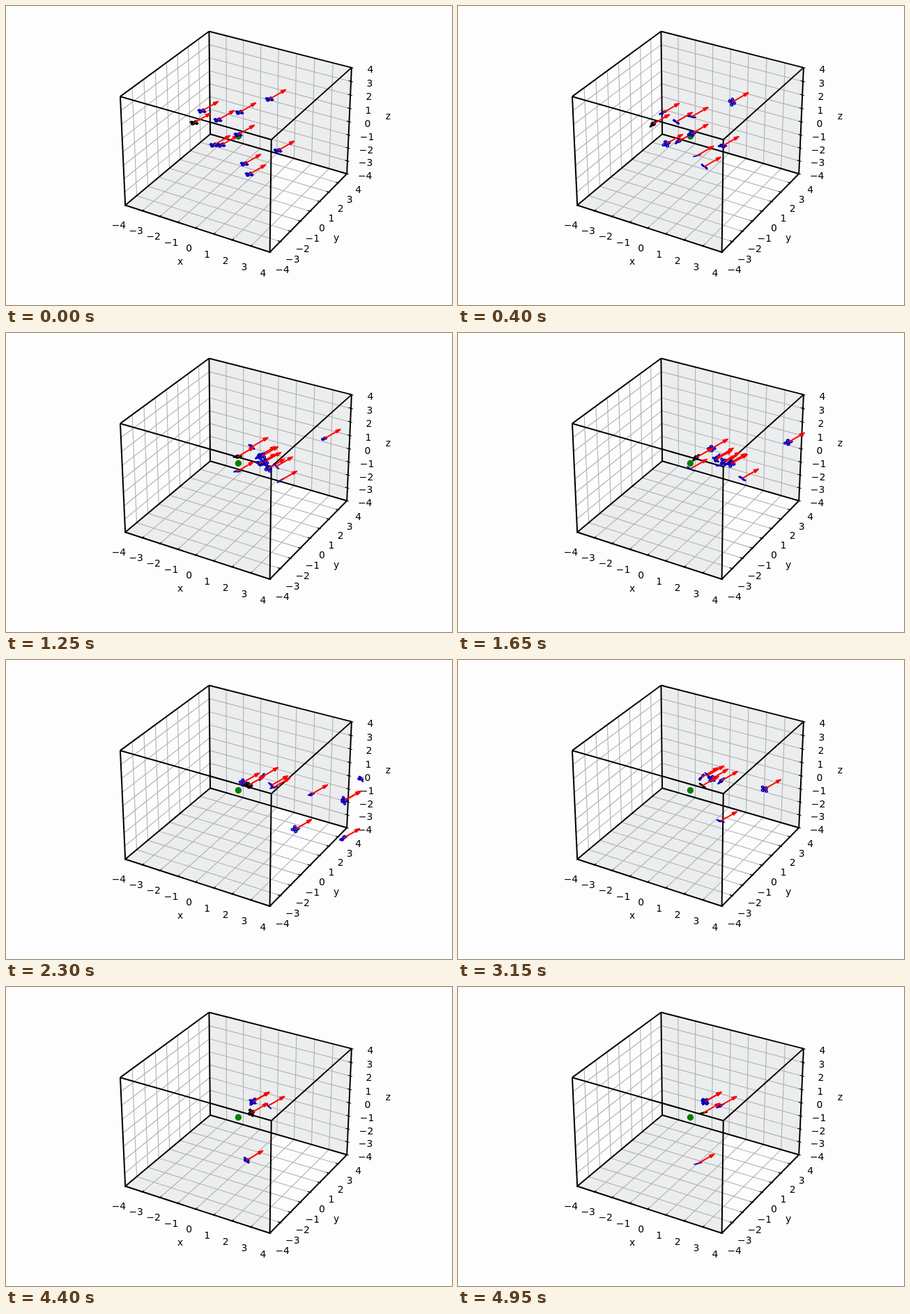
Write an HTML page that moves like this. It is 640 by 430 pixels and loops after 5 s.

```html
<!DOCTYPE html>
<html lang="en">
<head>
<meta charset="utf-8">
<title>Swarm in a box</title>
<style>
html, body { margin: 0; width: 100%; height: 100%; overflow: hidden; background: #fdfdfd; }
svg { display: block; width: 640px; height: 430px; }
text { font: 13.89px "DejaVu Sans", sans-serif; text-anchor: middle; }
path { fill: none; }
</style>
</head>
<body>
<svg id="stage" viewBox="0 0 640 430">
  <defs><clipPath id="axes"><rect width="513" height="430"/></clipPath></defs>
  <g id="box"></g>
  <g id="swarm" clip-path="url(#axes)"></g>
</svg>
<script>
const LOOP = 5000, STEP = 50;
const box = document.getElementById('box');
const swarm = document.getElementById('swarm');

function add(parent, tag, attrs, text) {
  const el = document.createElementNS('http://www.w3.org/2000/svg', tag);
  for (const k in attrs) el.setAttribute(k, attrs[k]);
  if (text !== undefined) el.textContent = text;
  parent.appendChild(el);
  return el;
}

// Perspective view: elevation 30, azimuth -60, distance 10.
function project(x, y, z) {
  const a = x / 7, b = y / 7, c = z * 3 / 28;
  const f = 2080 / (10 - (0.433 * a - 0.75 * b + 0.5 * c));
  return [333 + f * (0.866 * a + 0.5 * b), 187.9 - f * (-0.25 * a + 0.433 * b + 0.866 * c), f / 208];
}

const pathOf = pts => 'M' + pts.map(p => p[0].toFixed(2) + ' ' + p[1].toFixed(2)).join('L');
const line = (pts, stroke, width) =>
  add(box, 'path', { d: pathOf(pts.map(p => project(...p))), stroke, 'stroke-width': width });
const shade = pts => add(box, 'path', { d: pathOf(pts) + 'Z', style: 'fill: #ebedee' });

function label(v, point, dx, dy) {
  const [x, y, s] = project(...point);
  add(box, 'text', { x: x + dx * s, y: y + dy * s + 5 }, String(v).replace('-', '\u2212'));
}

function drawBox() {
  const a = project(-4, -4, -4), b = project(-4, 4, -4), c = project(4, 4, -4), d = project(4, -4, -4);
  const cut = [380.8, b[1] + (c[1] - b[1]) * (380.8 - b[0]) / (c[0] - b[0])];
  shade([b, c, project(4, 4, 4), project(-4, 4, 4)]);
  shade([a, b, cut, d]);

  for (let v = -3; v < 4; v++) {
    line([[v, -4, -4], [v, 4, -4], [v, 4, 4]], '#b0b0b0', 1.1);
    line([[4, v, -4], [-4, v, -4], [-4, v, 4]], '#b0b0b0', 1.1);
    line([[4, 4, v], [-4, 4, v], [-4, -4, v]], '#b0b0b0', 1.1);
  }
  for (const p of [-4, 4]) for (const q of [-4, 4]) {
    line([[-4, p, q], [4, p, q]], '#000', 2);
    line([[p, -4, q], [p, 4, q]], '#000', 2);
    line([[p, q, -4], [p, q, 4]], '#000', 2);
  }
  for (let v = -4; v <= 4; v++) {
    line([[v, -3.87, -4], [v, -4.07, -4]], '#000', 1.1);
    line([[3.87, v, -4], [4.07, v, -4]], '#000', 1.1);
    line([[3.87, 4, v], [4.1, 4, v]], '#000', 1.1);
    label(v, [v, -4, -4], -9.3, 28.4);
    label(v, [4, v, -4], 17.2, 24);
    label(v, [4, 4, v], 27, 2.5);
  }
  add(box, 'text', { x: 250, y: 372 }, 'x');
  add(box, 'text', { x: 474, y: 338 }, 'y');
  add(box, 'text', { x: 548.5, y: 163 }, 'z');
}

// The leader glides to its post and slows down on the way.
function leaderAt(s) {
  const left = 1 / (1 + (s / 0.83) ** 2.7);
  return [353 - 83 * left, 181 - 13 * left];
}

// Followers hold offsets from the leader at these shared seconds.
const BEATS = [0, 1.65, 2.3, 3.15, 3.85];
const HOME = [2, -16];

// Smooth curve through the offsets, then either ease home or fly straight on.
function offsetAt({ keys, home }, s) {
  const n = keys.length - 1, end = BEATS[n];
  const slope = (i, j, k) => (keys[j][k] - keys[i][k]) / (BEATS[j] - BEATS[i]);
  if (s >= end) {
    const ease = 1 - (1 - (s - end) / (LOOP / 1000 - end)) ** 3;
    return keys[n].map((v, k) => home ? v + (home[k] - v) * ease : v + slope(n - 1, n, k) * (s - end));
  }
  const i = BEATS.findIndex((b, j) => s < BEATS[j + 1]);
  const span = BEATS[i + 1] - BEATS[i], u = (s - BEATS[i]) / span;
  return keys[i].map((v, k) => {
    const e = keys[i + 1][k] - v;
    const m = slope(Math.max(i - 1, 0), i + 1, k) * span;
    const r = slope(i, Math.min(i + 2, n), k) * span;
    return v + u * (m + u * (3 * e - 2 * m - r + u * (m + r - 2 * e)));
  });
}

const drones = [];

function drone(keys, home, color = '#0000c0') {
  const g = add(swarm, 'g', {});
  const frame = add(g, 'path', { stroke: color, 'stroke-width': 1.7, 'stroke-linejoin': 'round' });
  add(g, 'path', {
    d: 'M0 0L23.2 -13.4M16.8 -12L23.2 -13.4L18.6 -8.8Z',
    stroke: '#f00', 'stroke-width': 2, 'stroke-linejoin': 'round', style: 'fill: #f00'
  });
  drones.push({ g, frame, keys, home, seed: drones.length + 1 });
}

// Four rotor rings on a cross that tilts more as the flight goes on.
function frameOf(seed, s) {
  const grow = Math.min(1, s * 2);
  const roll = grow * 0.9 * Math.sin(s * (2.1 + seed * 0.37) + seed);
  const pitch = grow * 0.9 * Math.sin(s * (2.7 + seed * 0.23) + seed * 2);
  const yaw = grow * Math.sin(s * 1.7 + seed);
  const [ox, oy] = project(0, 0, 0);
  const place = (r, a) => {
    const x = r[0] * Math.cos(yaw) - r[1] * Math.sin(yaw), y = r[0] * Math.sin(yaw) + r[1] * Math.cos(yaw);
    const p = project(x * Math.cos(pitch), y * Math.cos(roll), y * Math.sin(roll) - x * Math.sin(pitch));
    return [p[0] - ox, p[1] - oy];
  };
  let d = '';
  for (let k = 0; k < 4; k++) {
    const c = Math.cos(k * Math.PI / 2), n = Math.sin(k * Math.PI / 2);
    const ring = [];
    for (let j = 0; j < 8; j++) {
      const a = j * Math.PI / 4;
      ring.push(place([0.14 * c + 0.07 * Math.cos(a), 0.14 * n + 0.07 * Math.sin(a)]));
    }
    d += pathOf([[0, 0], place([0.14 * c, 0.14 * n])]) + pathOf(ring) + 'Z';
  }
  return d;
}

function buildSwarm() {
  drone([[28, 32], [-8, 16], [-8, -4]], HOME);
  add(swarm, 'circle', { cx: 333.4, cy: 187.5, r: 4.7, fill: '#008000' });
  drone([[11, -17], [22, -13], [19, -12]], HOME);
  drone([[34, -4], [30, 0], [33, 0]], [24, -10]);
  drone([[65, -15], [28, 3], [36, 3]], HOME);
  drone([[39, 32], [33, 11], [67, 63], [26, 51], [0, 39]], [-8, 73]);
  drone([[108, -34], [132, -22], [162, -9]]);
  drone([[63, 17], [39, 6], [90, 13], [89, 5], [170, 9]]);
  drone([[72, 59], [48, 8], [137, 22]]);
  drone([[79, 74], [66, 30], [136, 76]]);
  drone([[120, 40], [50, 9], [138, 22]]);
  drone([[0, 0]], [0, 0], '#000');
}

function render(t) {
  const s = t / 1000, [lx, ly] = leaderAt(s);
  for (const d of drones) {
    const [x, y] = offsetAt(d, s);
    d.g.setAttribute('transform', `translate(${(lx + x).toFixed(2)} ${(ly + y).toFixed(2)})`);
    d.frame.setAttribute('d', frameOf(d.seed, s));
  }
}

drawBox();
buildSwarm();
const start = performance.now();
function tick(now) {
  const t = Math.max(0, now - start) % LOOP;
  render(Math.floor(t / STEP) * STEP);
  requestAnimationFrame(tick);
}
render(0);
requestAnimationFrame(tick);
</script>
</body>
</html>
```
